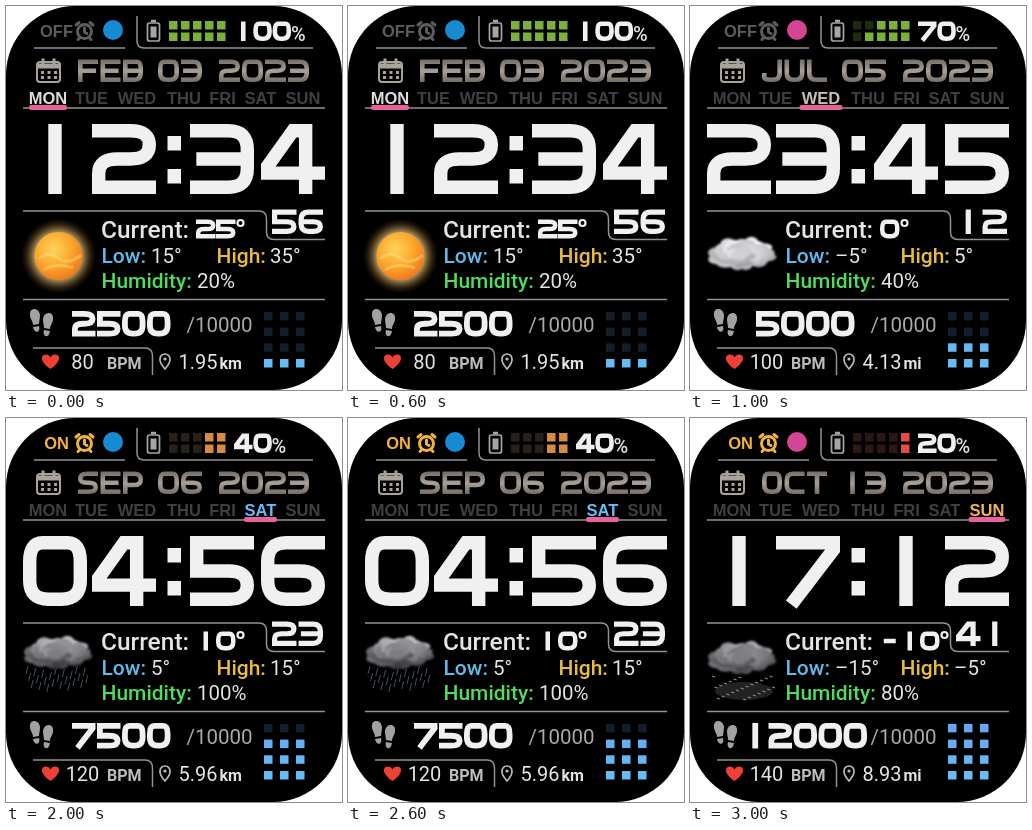
Recreate the animation shown at these times as an HTML page. Size 336x384 px, loop 4000 ms.

```html
<!DOCTYPE html>
<html lang="en">
<head>
<meta charset="utf-8">
<title>Watch face</title>
<style>
html, body { margin: 0; width: 100%; height: 100%; overflow: hidden; background: #fff; }
svg { display: block; width: 336px; height: 384px; }
text { font-family: Roboto, "Open Sans", sans-serif; font-weight: 500; fill: #e4e4e4; }
text.thin { font-weight: 400; }
text.bold { font-weight: 700; }
text.cap { font: bold 16.5px "Liberation Sans", Arial, sans-serif; text-anchor: middle; }
.wide { fill: none; stroke-linecap: square; }
.state { opacity: 0; animation: show 4s step-end infinite; }
@keyframes show { 0% { opacity: 1; } 25%, 100% { opacity: 0; } }
</style>
</head>
<body>
<svg id="face" viewBox="0 0 336 384">
  <defs>
    <linearGradient id="metal" gradientUnits="userSpaceOnUse" x1="0" y1="53" x2="0" y2="77">
      <stop offset="0" stop-color="#716b64"/><stop offset=".5" stop-color="#a89f95"/><stop offset="1" stop-color="#70695f"/>
    </linearGradient>
    <radialGradient id="glow">
      <stop offset=".5" stop-color="#fff2b8"/><stop offset=".7" stop-color="#c9a560" stop-opacity=".6"/><stop offset="1" stop-color="#4a2a08" stop-opacity="0"/>
    </radialGradient>
    <radialGradient id="sun" cx=".4" cy=".35" r=".7">
      <stop offset="0" stop-color="#ffd45a"/><stop offset=".55" stop-color="#fba52b"/><stop offset="1" stop-color="#ee741c"/>
    </radialGradient>
    <g id="alarm" fill="none" stroke-width="3" stroke-linecap="round">
      <circle cx="78.500" cy="25.500" r="7"/>
      <path d="M78.500 22V26L81 27.500M70 19L73 16.500M87 19L84 16.500M73.500 32L72 33.500M83.500 32L85 33.500"/>
    </g>
  </defs>
  <rect width="336" height="384" rx="69" fill="#000"/>
  <path fill="none" stroke="#929292" stroke-width="1.500" d="M28 42H119M131 10V35Q131 42 138 42H307M17 102H319M17 205H253Q260.500 205 260.500 213V226Q260.500 233.500 268 233.500H319M17 293.500H319M27 342H139Q146.500 342 146.500 350V369"/>
  <g fill="none" stroke="#a5a5a5" stroke-width="1.700">
    <rect x="141.500" y="17" width="12" height="18" rx="2"/>
    <path d="M145 15H150" stroke-width="2.500"/>
    <path d="M147.500 20.500V31.500" stroke-width="6"/>
  </g>
  <g fill="none" stroke="#aaa39a" stroke-width="2">
    <rect x="31" y="56" width="23" height="20" rx="3"/>
    <path d="M31 60H54" stroke-width="5"/>
    <path d="M37 52.500V58M48 52.500V58" stroke-width="3"/>
    <path d="M35 66.500H51M35 71.500H51" stroke-width="3" stroke-dasharray="3 3.500"/>
  </g>
  <g fill="#a2a2a2">
    <path d="M24 309C23 301 33 301 34 309C34 313 33 315 33 318L27 319C27 315 24 313 24 309ZM27 321L33 320C35 327 28 328 27 321Z"/>
    <path d="M47 313C48 305 38 305 37 313C37 317 38 319 38 322L44 323C44 319 47 317 47 313ZM44 325L38 324C36 331 43 333 44 325Z"/>
  </g>
  <path transform="translate(6.700 53.500) scale(.85)" d="M44.500 364C30 354 34 347 39 347Q43 347 44.500 350.500Q46 347 50 347C55 347 59 354 44.500 364Z" fill="#ee4036"/>
  <path d="M159 363C153 356 154 354 154 353A5 5 0 0 1 164 353C164 354 165 356 159 363Z" fill="none" stroke="#bbb" stroke-width="1.700"/>
  <circle cx="159" cy="353" r="1.600" fill="#bbb"/>
</svg>
<script>
// Strokes on a 0-8 grid; "!" keeps a corner sharp, "+" starts a new stroke.
const GLYPHS = {
  0: '40 80 88 08 00 40', 1: '40 48', 2: '00 80 84 04 08! 88',
  3: '00 80 88 08+14 84', 4: '68 60! 40! 05! 06! 86', 5: '80 00! 04! 84 88 08',
  6: '80 00 08 88 84 04', 7: '00 80! 81! 28', '-': '24 64',
  F: '80 00! 08+04 74', E: '80 00! 08! 88+04 74', B: '40 80 88 08! 00! 40+04 84',
  J: '80 88 08 06', U: '00 08 88 80', L: '00 08 88', S: '80 00 04 84 88 08',
  P: '08 00! 80 85 05', O: '40 80 88 08 00 40', C: '80 00 08 88', T: '00 80+40 48'
};

// Name, centre and underline width
const DAYS = [['MON', 42, 38], ['TUE', 85.5, 33], ['WED', 131, 43], ['THU', 178, 33], ['FRI', 216.5, 28], ['SAT', 254.5, 33], ['SUN', 297, 37]];

const STATES = [
  { on: false, bt: '#168bd2', bat: 100, hue: '#7bb13a', dim: '#1d2b10', date: 'FEB 03 2023', day: 0, dayHue: '#ddd',
    time: '1234', sec: '56', temp: '25', low: '15°', high: '35°', hum: 20, steps: 2500, bpm: 80, dist: '1.95', unit: 'km', sky: sunny },
  { on: false, bt: '#d44593', bat: 70, hue: '#7bb13a', dim: '#1d2b10', date: 'JUL 05 2023', day: 2, dayHue: '#c8c0b8',
    time: '2345', sec: '12', temp: '0', low: '–5°', high: '5°', hum: 40, steps: 5000, bpm: 100, dist: '4.13', unit: 'mi', sky: cloudy },
  { on: true, bt: '#168bd2', bat: 40, hue: '#d98a42', dim: '#27211a', date: 'SEP 06 2023', day: 5, dayHue: '#62bdf8',
    time: '0456', sec: '23', temp: '10', low: '5°', high: '15°', hum: 100, steps: 7500, bpm: 120, dist: '5.96', unit: 'km', sky: rainy },
  { on: true, bt: '#d44593', bat: 20, hue: '#e84a45', dim: '#2c1715', date: 'OCT 13 2023', day: 6, dayHue: '#f2b54a',
    time: '1712', sec: '41', temp: '-10', low: '–15°', high: '–5°', hum: 80, steps: 12000, bpm: 140, dist: '8.93', unit: 'mi', sky: snowy }
];

function stroke(code, x, y, w, h, t) {
  const pts = code.split(' ').map(p => ({
    x: x + t / 2 + p[0] / 8 * (w - t), y: y + t / 2 + p[1] / 8 * (h - t), sharp: p[2] === '!'
  }));
  const toward = (a, b) => {
    const len = Math.hypot(b.x - a.x, b.y - a.y), k = Math.min(t * 1.4, len / 2) / len;
    return `${(a.x + (b.x - a.x) * k).toFixed(2)} ${(a.y + (b.y - a.y) * k).toFixed(2)}`;
  };
  return pts.map((p, i) => {
    if (!i) return `M${p.x} ${p.y}`;
    if (p.sharp || i === pts.length - 1) return `L${p.x} ${p.y}`;
    return `L${toward(p, pts[i - 1])}Q${p.x} ${p.y} ${toward(p, pts[i + 1])}`;
  }).join('');
}

function wide(str, x, y, w, h, t, pitch, color = '#f0f0f0') {
  const d = [...String(str)].map((c, i) =>
    GLYPHS[c].split('+').map(s => stroke(s, x + i * pitch, y, w, h, t)).join('')).join('');
  return `<path class="wide" role="img" aria-label="${str}" d="${d}" stroke="${color}" stroke-width="${t}"/>`;
}

const text = (str, x, y, size, extra = '') => `<text x="${x}" y="${y}" font-size="${size}" ${extra}>${str}</text>`;
const fill = c => `style="fill:${c}"`;
const cap = (str, x, y, color) => `<text class="cap" x="${x}" y="${y}" ${fill(color)}>${str}</text>`;
const thin = 'class="thin"';
const box = (x, y, w, h, c) => `<rect x="${x}" y="${y}" width="${w}" height="${h}" fill="${c}"/>`;

function sunny() {
  return '<circle cx="52.5" cy="250" r="38" fill="url(#glow)"/><circle cx="52.500" cy="250" r="24" fill="url(#sun)"/>' +
    '<path d="M32 253Q42 244 52 252T75 249M37 264Q50 256 67 262" fill="none" stroke="#ffe08a" stroke-width="3" opacity=".4"/>';
}

// A cloud of soft puffs, lighter towards the top
function puffs(id, cy, top, bottom) {
  let out = '';
  const n = 44;
  for (let i = n; i > 0; i--) {
    const r = Math.sqrt(i / n), a = i * 2.4, dy = r * Math.sin(a);
    const tone = Math.round(top + (bottom - top) * (dy + 1) / 2 + i * 37 % 50 - 25);
    out += `<ellipse cx="${(52 + 27 * r * Math.cos(a)).toFixed(1)}" cy="${(cy + 12 * dy).toFixed(1)}" rx="${7 + i % 4}" ry="${4 + i % 3}" fill="rgb(${tone},${tone},${tone + 5})"/>`;
  }
  return `<filter id="${id}"><feGaussianBlur stdDeviation="1.3"/></filter><g filter="url(#${id})">${out}</g>`;
}

function cloudy() {
  return puffs('soft', 248, 235, 165);
}

function rainy() {
  let d = '';
  for (let i = 0; i < 24; i++) d += `M${22 + i * 2.6} ${248 + i * 7 % 19}l-2 8`;
  return `<path d="${d}" stroke="#4d5a66" stroke-width=".9"/>` + puffs('rain', 235, 190, 50);
}

function snowy() {
  let d = '';
  for (let i = 0; i < 26; i++) d += `M${22 + i * 2.4} ${258 + i * 11 % 24}l3 1`;
  return '<ellipse cx="54" cy="273" rx="29" ry="9" fill="#555" opacity=".4"/>' +
    `<path d="${d}" stroke="#8a8a8a" stroke-width="1.200"/>` + puffs('snow', 240, 165, 70);
}

function battery(s) {
  let out = '';
  for (let i = 0; i < 10; i++) {
    const lit = i >= 10 - s.bat / 10;
    out += box(163 + (i >> 1) * 12, 15 + i % 2 * 11.5, 8.5, 8.5, lit ? s.hue : s.dim);
  }
  const end = 228 + String(s.bat).length * 19.3;
  return out + wide(s.bat, 228, 15.5, 18.5, 19.5, 4.6, 19.3) + text('%', end - 1, 35, 20);
}

function stepGrid(steps) {
  const lit = Math.min(12, Math.floor(steps / 2500) * 3);
  let out = '';
  for (let i = 0; i < 12; i++) {
    const row = i / 3 | 0;
    out += box(258 + i % 3 * 16, 353 - row * 15.7, 8.5, 8.5, i < lit ? `hsl(${204 + row * 3} 88% 68%)` : '#121e29');
  }
  return out;
}

function week(s) {
  return DAYS.map(([name, x, w], i) => {
    const now = i === s.day;
    return (now ? `<rect x="${x - w / 2}" y="99" width="${w}" height="5" rx="2" fill="#e8619c"/>` : '') +
      cap(name, x, 98, now ? s.dayHue : '#404040');
  }).join('');
}

function render(s, i) {
  const [month, date, year] = s.date.split(' ');
  const alert = s.on ? '#f3b240' : '#5d5d5d';
  const steps = String(s.steps);
  const clock = [17, 86, 184, 255].map((x, n) => wide(s.time[n], x, 118, 64, 70, 13.4, 0)).join('');
  return `<g class="state" style="animation-delay:${i - 4}s">` + [
    cap(s.on ? 'ON' : 'OFF', 50.5, 30.5, alert),
    `<use href="#alarm" stroke="${alert}"/><circle cx="107" cy="24" r="10" fill="${s.bt}"/>`,
    battery(s),
    wide(month, 72, 53.5, 20, 22.5, 4.6, 22.5, 'url(#metal)'),
    wide(date, 152, 53.5, 21, 22.5, 4.6, 23, 'url(#metal)'),
    wide(year, 213, 53.5, 21, 22.5, 4.6, 23, 'url(#metal)'),
    week(s), clock,
    box(161.5, 130, 13.5, 14.5, '#f0f0f0') + box(161.5, 163, 13.5, 14.5, '#f0f0f0'),
    wide(s.sec, 266, 203.5, 24.5, 24.5, 5.2, 26.5),
    s.sky(),
    text('Current:', 95, 232, 24.5),
    wide(s.temp, 190, 213.5, 19.5, 19, 4.5, 20),
    `<circle cx="${194.5 + s.temp.length * 20}" cy="217" r="3" fill="none" stroke="#f0f0f0" stroke-width="2.200"/>`,
    text('Low:', 95.5, 257, 21, fill('#5fbbea')), text(s.low, 145, 257, 20.5, thin),
    text('High:', 210.5, 257, 21, fill('#e9bb3f')), text(s.high, 264, 257, 20.5, thin),
    text('Humidity:', 95.5, 282, 21, fill('#50dc5c')), text(s.hum + '%', 191, 282, 20.5, thin),
    wide(steps, 116 - steps.length * 12.5, 305, 23.5, 25.5, 5.8, 25),
    text('/10000', 180.5, 326, 20.5, `${thin} ${fill('#aaa')}`),
    stepGrid(s.steps),
    text(s.bpm, 76.5, 362.5, 20, `${thin} text-anchor="middle"`),
    text('BPM', 101, 362.5, 16, `class="bold" ${fill('#bdbdbd')}`),
    text(s.dist, 172.5, 362.5, 20, thin), text(s.unit, 213.5, 362.5, 16, 'class="bold"')
  ].join('') + '</g>';
}

document.getElementById('face').insertAdjacentHTML('beforeend', STATES.map(render).join(''));
</script>
</body>
</html>
```
